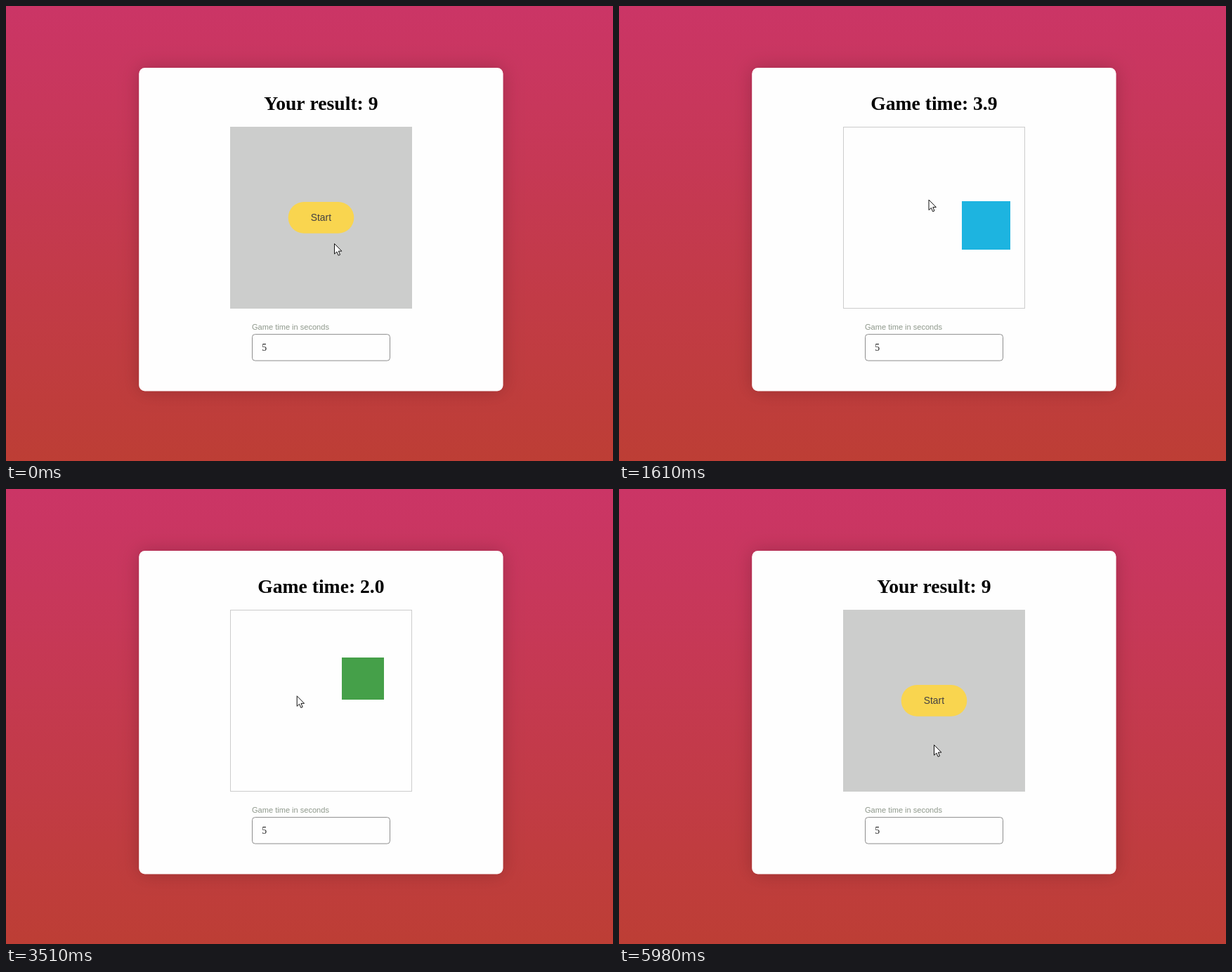
These frames come from a looping animation (864 px wide and 648 px high, 6230 ms). An HTML page with a canvas:

```html
<!DOCTYPE html>
<html lang="en">
<head>
<meta charset="utf-8">
<title>Click game</title>
<style>
html, body { margin: 0; width: 100%; height: 100%; overflow: hidden; }
canvas { display: block; }
</style>
</head>
<body>
<canvas id="stage" width="864" height="648"></canvas>
<script>
const ctx = document.getElementById('stage').getContext('2d');
const LOOP = 6230, START = 470, END = 5580;
const PRESS = 120, REACT = 140;
const MID = 448.4;
const SERIF = '"Liberation Serif", "Times New Roman", serif';
const SANS = '"Liberation Sans", Arial, sans-serif';
const GREEN = '#45a049', CYAN = '#1db4e0', PURPLE = '#381b6e', BLUE = '#16589a';

// A square shown until a given time; ax, ay: where it is hit, as a share of its size.
const square = (until, x, y, size, color, ax = .5, ay = .5) =>
  ({ until, x, y, size, color, hitX: x + ax * size, hitY: y + ay * size });

const squares = [
  square(990, 448.3, 224.6, 45.8, GREEN, .73, 0),
  square(1470, 418, 253, 46, PURPLE),
  square(1920, 488, 278, 69, CYAN, .2, .4),
  square(2320, 348, 348, 70, BLUE),
  square(2870, 407.8, 281.7, 59.6, PURPLE, .15, .65),
  square(3270, 385, 288, 82, CYAN, .1, .15),
  square(3900, 478, 240, 60, GREEN),
  square(4510, 435.5, 310, 81.3, BLUE, .37, .44),
  square(5210, 352, 380, 50, PURPLE),
  square(END, 411, 361, 60.7, CYAN)
];
const squareAt = t => squares.find(s => t < s.until);

// Each hit: arrive, press, then rest until the next square has been noticed.
const hits = [{ until: START, hitX: 449, hitY: 308 }, ...squares.slice(0, -1)];
const stop = (arrive, leave, x, y) => ({ arrive, leave, x, y });
const stops = [
  stop(0, 50, 467.5, 338.5),
  ...hits.map(h => stop(h.until - PRESS, h.until + REACT, h.hitX, h.hitY)),
  stop(5530, 5600, 381.5, 390),
  stop(5980, LOOP, 448.5, 364.5)
];

const arrow = new Path2D('M0 0V14.6L3.4 11.5L5.6 16.7L8 15.7L5.8 10.6H10.4Z');
const hand = new Path2D('M-1.5 1.5Q0-.8 1.5 1.5V7Q3.5 5.8 4.2 7.5Q6 6.4 6.8 8.2' +
  'Q9 7.4 9.2 9.5V14Q9 17 7.5 18V20H-.5V18Q-3 15-5 11.5Q-5 9.5-3 10.3L-1.5 12Z');

function roundBox(x, y, w, h, r) {
  ctx.beginPath();
  ctx.roundRect(x, y, w, h, r);
}

function text(str, x, y, font, color, align = 'left') {
  ctx.font = font;
  ctx.fillStyle = color;
  ctx.textAlign = align;
  ctx.fillText(str, x, y);
}

function pointerAt(t) {
  const i = stops.findIndex(s => t < s.leave);
  const to = stops[i];
  if (t >= to.arrive) return [to.x, to.y];
  const from = stops[i - 1];
  const k = (t - from.leave) / (to.arrive - from.leave);
  const e = k * k * (3 - 2 * k);
  return [from.x + (to.x - from.x) * e, from.y + (to.y - from.y) * e];
}

function drawPage() {
  const sky = ctx.createLinearGradient(0, 0, 0, 648);
  sky.addColorStop(0, '#cb3566');
  sky.addColorStop(1, '#bd3e35');
  ctx.fillStyle = sky;
  ctx.fillRect(0, 0, 864, 648);

  ctx.save();
  ctx.shadowColor = 'rgba(0,0,0,.2)';
  ctx.shadowBlur = 26;
  ctx.fillStyle = '#fefefe';
  roundBox(189.2, 88, 518.4, 460.5, 8.5);
  ctx.fill();
  ctx.restore();

  text('Game time in seconds', 350, 460.5, '11.06px ' + SANS, '#8d978a');
  ctx.strokeStyle = '#8e8e8e';
  ctx.lineWidth = 1;
  roundBox(350.5, 467.6, 196, 37.5, 4);
  ctx.stroke();
  text('5', 364.3, 491, '13.8px ' + SERIF, '#222');
}

function drawField(t, playing) {
  if (!playing) {
    ctx.fillStyle = '#cccdcc';
    ctx.fillRect(319, 172, 259, 259);
    ctx.fillStyle = '#f9d54f';
    roundBox(401.7, 279, 93.6, 44.8, 22.4);
    ctx.fill();
    text('Start', MID, 306, '13.82px ' + SANS, '#423f42', 'center');
    return;
  }
  ctx.strokeStyle = '#ccc';
  ctx.lineWidth = 1;
  ctx.strokeRect(319.5, 172.5, 258, 258);
  const { x, y, size, color } = squareAt(t);
  ctx.fillStyle = color;
  ctx.fillRect(x, y, size, size);
}

function isOver(t, x, y, playing) {
  if (!playing) return Math.abs(x - MID) < 47 && Math.abs(y - 301.4) < 22;
  const s = squareAt(t);
  return x >= s.x && x <= s.x + s.size && y >= s.y && y <= s.y + s.size;
}

function drawPointer(t, playing) {
  const [x, y] = pointerAt(t);
  if (hits.some(h => t >= h.until - PRESS && t < h.until)) {
    ctx.fillStyle = 'rgba(255,255,0,.5)';
    ctx.beginPath();
    ctx.arc(x - .5, y, 10.4, 0, Math.PI * 2);
    ctx.fill();
  }
  const over = isOver(t, x, y, playing);
  const shape = over ? hand : arrow;
  ctx.save();
  ctx.translate(x, over ? y + .8 : y);
  ctx.fillStyle = '#fff';
  ctx.strokeStyle = '#111';
  ctx.lineWidth = 1;
  ctx.fill(shape);
  ctx.stroke(shape);
  ctx.restore();
}

function draw(t) {
  const playing = t >= START && t < END;
  const left = Math.max(0, 50 - Math.floor((t - START) / 100)) / 10;
  const title = playing ? 'Game time: ' + left.toFixed(1) : 'Your result: 9';
  drawPage();
  text(title, MID, 148, 'bold 27.65px ' + SERIF, '#000', 'center');
  drawField(t, playing);
  drawPointer(t, playing);
}

const began = performance.now();
function tick() {
  draw((performance.now() - began) % LOOP);
  requestAnimationFrame(tick);
}
tick();
</script>
</body>
</html>
```
